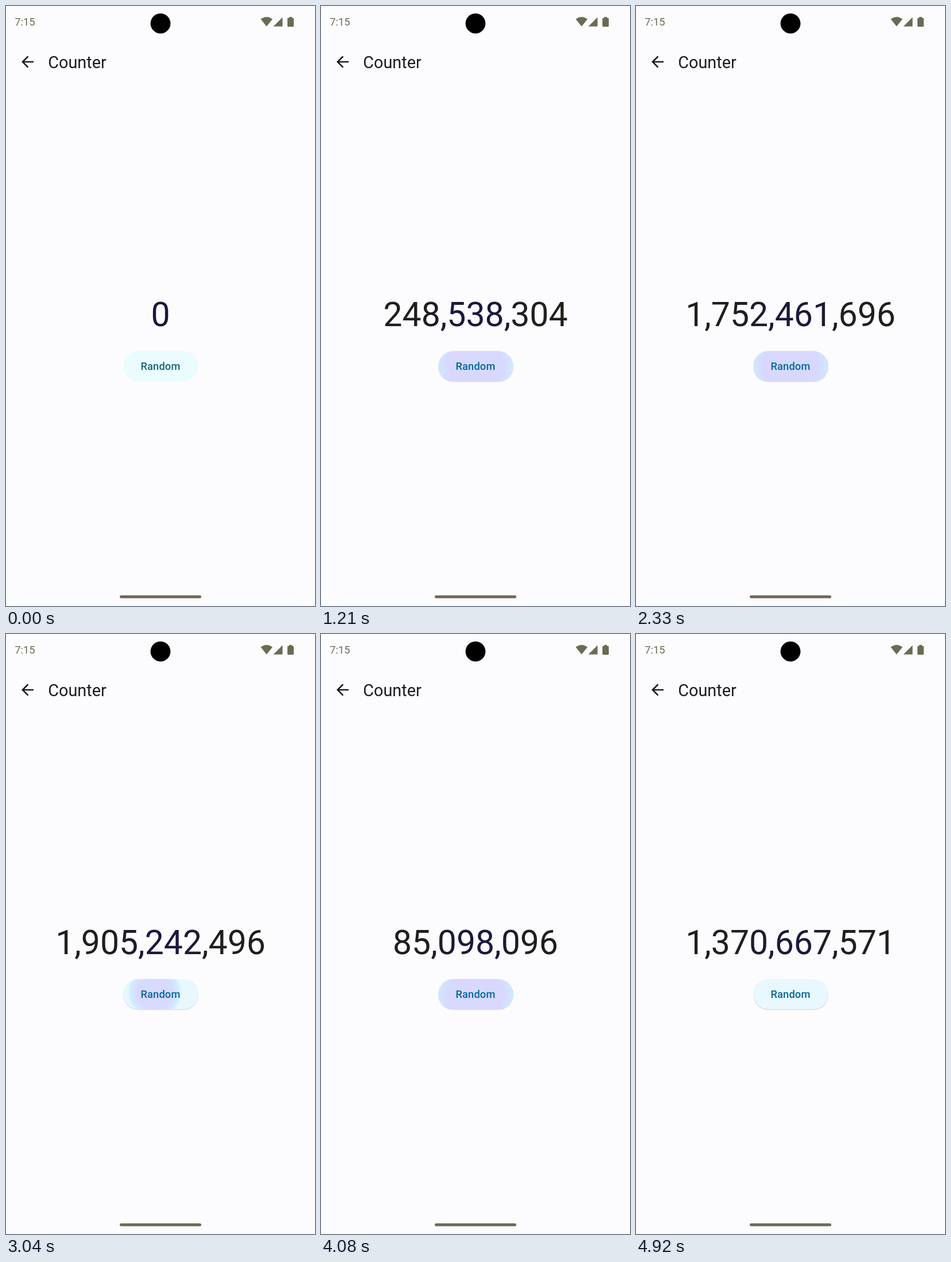
These frames come from a looping animation (538x1042 px, 5000 ms). An HTML page:

```html
<!DOCTYPE html>
<html lang="en">
<head>
<meta charset="utf-8">
<title>Counter</title>
<style>
  html, body { margin: 0; width: 100%; height: 100%; overflow: hidden; background: #fcfcff; }
  svg { display: block; width: 100%; height: 100%; font-family: Roboto, sans-serif; }
  .system { fill: #6b6b55; }
  .middle { text-anchor: middle; }
  .fresh #shadow { visibility: hidden; }
  .fresh #face { fill: #ebfcff; }
  .fresh #label { fill: #16667a; }
</style>
</head>
<body>
<svg id="screen" viewBox="0 0 538 1042">
  <defs>
    <linearGradient id="ink" gradientUnits="userSpaceOnUse" x1="90" x2="450">
      <stop offset=".25" stop-color="#1f1f1d"/>
      <stop offset=".42" stop-color="#1a193c"/>
      <stop offset=".58" stop-color="#1a193c"/>
      <stop offset=".75" stop-color="#1f1f1d"/>
    </linearGradient>
    <radialGradient id="glow">
      <stop offset=".6" stop-color="#d8d8ff"/>
      <stop offset=".84" stop-color="#cfeaff"/>
      <stop offset="1" stop-color="#d8f4ff" stop-opacity="0"/>
    </radialGradient>
    <clipPath id="pill"><rect x="204" y="599.3" width="131" height="52.4" rx="26.2"/></clipPath>
  </defs>

  <g class="system">
    <text x="15.2" y="34" font-size="18.3">7:15</text>
    <path d="M443.5 22.8Q453.700 15 464 22.8L453.700 35.500Z"/>
    <path d="M465.500 35.500H481.500V19.500Z"/>
    <path d="M493 19h5v1.800h1.500q1.500 0 1.500 1.500V34.500q0 1.500-1.500 1.500h-8q-1.500 0-1.500-1.500V22.300q0-1.500 1.500-1.500H493Z"/>
    <rect x="198" y="1023.500" width="142" height="5" rx="2.500"/>
  </g>
  <circle cx="269" cy="30.300" r="17.400"/>

  <path fill="#1c1b1f" transform="translate(21.800 81.300) scale(1.309)"
        d="M20 11H7.830l5.590-5.590L12 4l-8 8 8 8 1.410-1.410L7.830 13H20z"/>
  <text x="73.300" y="107.500" font-size="28.800" fill="#1c1b1f">Counter</text>

  <text id="count" class="middle" x="269" y="556" font-size="58.900" fill="url(#ink)">0</text>

  <rect id="shadow" x="204" y="600.800" width="131" height="52" rx="26" fill="#cfcff8"/>
  <rect id="face" x="204" y="599.300" width="131" height="52.400" rx="26.200" fill="#e9f7fe"/>
  <g clip-path="url(#pill)"><circle id="ripple" fill="url(#glow)"/></g>
  <text id="label" class="middle" x="269" y="632" font-size="18.300" font-weight="500"
        letter-spacing=".13" fill="#00699a">Random</text>
</svg>

<script>
const LOOP = 5000, STEP = 125 / 3, LAST_STEP = 118;
const STIFFNESS = 1500, REST = 500;

// Press time, release time, new value.
const taps = [
  [260, 380, 1486210573],
  [690, 800, 248535485],
  [1000, 1225, 927445274],
  [1785, 1900, 1752462451],
  [2120, 2350, 1148390227],
  [2530, 2640, 1905244693],
  [2970, 3090, 1531207946],
  [3480, 3600, 85097884],
  [3870, 4100, 1370667571],
].map(([press, release, value]) => ({ press, release, value }));

const el = id => document.getElementById(id);
const [screen, count, ripple] = ["screen", "count", "ripple"].map(el);
const clamp = x => Math.max(0, Math.min(1, x));
const mix = (a, b, p) => a + (b - a) * p;

// Critically damped spring in single precision.
function valueAt(t) {
  const i = taps.findLastIndex(tap => tap.release <= t);
  if (i < 0) return 0;
  const { release, value } = taps[i];
  if (t - release > REST) return value;
  const from = i ? taps[i - 1].value : 0;
  const x = Math.sqrt(STIFFNESS) * (t - release) / 1000;
  return Math.trunc(Math.fround(mix(value, from, (1 + x) * Math.exp(-x))));
}

function drawRipple(t) {
  const tap = taps.findLast(tap => tap.press <= t);
  if (!tap) return ripple.setAttribute("opacity", 0);
  const age = t - tap.press;
  const p = clamp(age / 225);
  const grow = p * p * (3 - 2 * p);
  const leave = Math.max(tap.release, tap.press + 225);
  ripple.setAttribute("cx", mix(255, 269, grow));
  ripple.setAttribute("cy", mix(621, 625.5, grow));
  ripple.setAttribute("r", mix(39, 80, grow));
  ripple.setAttribute("opacity", Math.min(clamp(age / 75), 1 - clamp((t - leave) / 150)));
}

function draw(now) {
  const step = Math.min(LAST_STEP, Math.floor((now % LOOP + 5) / STEP));
  const t = step * STEP;
  screen.classList.toggle("fresh", step === 0);
  count.textContent = valueAt(t).toLocaleString("en-US");
  drawRipple(t);
}

function tick() {
  draw(performance.now());
  requestAnimationFrame(tick);
}
tick();
</script>
</body>
</html>
```
